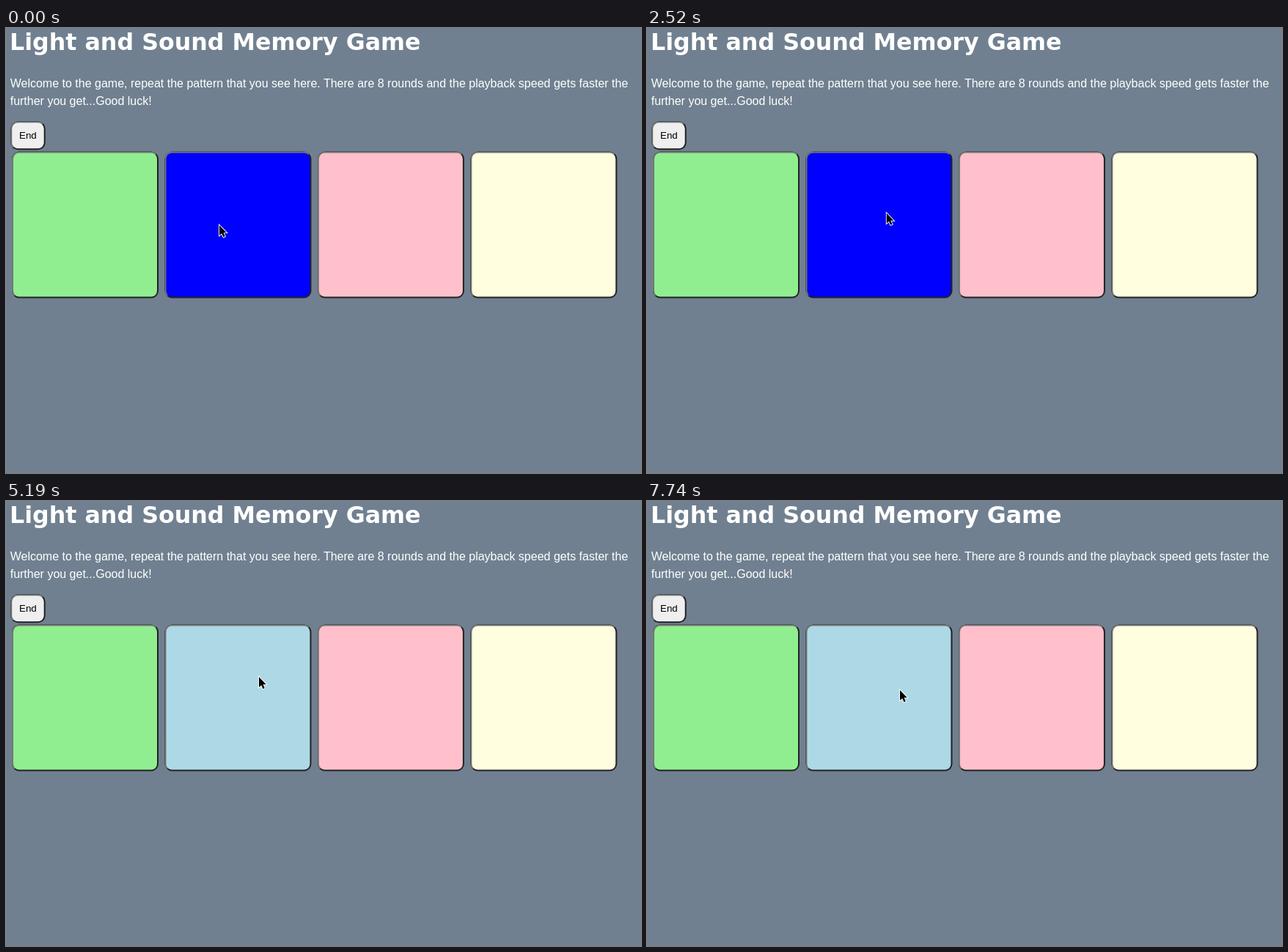
Recreate the animation shown at these times as an HTML page. Size 866 px wide and 607 px high, loop 8000 ms.

```html
<!DOCTYPE html>
<html lang="en">
<head>
<meta charset="utf-8">
<title>Light and Sound Memory Game</title>
<style>
  html, body { margin: 0; width: 100%; height: 100%; overflow: hidden; background: #708090; }
  svg { display: block; }
  text { font: 16px "Liberation Sans", Arial, sans-serif; fill: #fff; }
  .title { font: bold 31.7px "DejaVu Sans", Verdana, sans-serif; }
  .label { font-size: 13.33px; fill: #000; }
</style>
</head>
<body>
<svg width="866" height="607" viewBox="0 0 866 607">
  <text class="title" x="5" y="30">Light and Sound Memory Game</text>
  <text x="5.7" y="81">Welcome to the game, repeat the pattern that you see here. There are 8 rounds and the playback speed gets faster the</text>
  <text x="5.7" y="105">further you get...Good luck!</text>
  <g id="buttons"></g>
  <text class="label" x="18" y="151">End</text>
  <path id="cursor" d="M0 0V14L3.2 11.2 5.5 16.2 7.8 15.2 5.6 10.2H9.8Z"
    stroke="#fff" stroke-width="1.8" paint-order="stroke"/>
</svg>
<script>
const LOOP = 8000, STEP = 148;
const GREY = '#767676', DARK = '#222';
const buttons = document.getElementById('buttons');
const cursor = document.getElementById('cursor');

function add(parent, tag, attrs) {
  const el = document.createElementNS('http://www.w3.org/2000/svg', tag);
  for (const key in attrs) el.setAttribute(key, attrs[key]);
  return parent.appendChild(el);
}

// Raised button: the edge is split into a light top-left and a dark bottom-right half.
function addButton(x, y, width, height, fill) {
  const g = add(buttons, 'g', { transform: `translate(${x} ${y})` });
  const lower = add(g, 'rect', { width, height, rx: 10, fill: DARK });
  const upper = add(g, 'rect', { width, height, rx: 10, fill: GREY });
  const corner = Math.min(width, height) / 2;
  upper.style.clipPath = `polygon(0 0, ${width}px 0, ${width - corner}px ${corner}px, ${corner}px ${height - corner}px, 0 ${height}px)`;
  const face = add(g, 'rect', { x: 2, y: 2, width: width - 4, height: height - 4, rx: 8, fill });
  return { lower, upper, face };
}

addButton(6.2, 127.3, 47.5, 39, '#efefef');
const pads = ['lightgreen', 'lightblue', 'pink', 'lightyellow']
  .map((color, i) => addButton(8 + 208.45 * i, 168.5, 200, 200, color));
const bluePad = pads[1];

const playback = [[0, 440], [2520, 3260], [3560, 4450], [7140, 7740]];
const presses = [[1180, 1480], [4890, 5190], [5640, 6090]];

// Cursor moves: start time, number of steps, destination.
const moves = [
  [150, 1, 295, 269],
  [440, 4, 306, 240],
  [1780, 11, 344, 263],
  [3560, 3, 345, 251],
  [4150, 3, 345, 240],
  [6990, 3, 345, 258],
];

const within = (spans, t) => spans.some(([from, to]) => t >= from && t < to);

function cursorAt(t) {
  let x = 291, y = 269;
  for (const [start, steps, toX, toY] of moves) {
    if (t < start) break;
    const part = Math.min(1, (Math.floor((t - start) / STEP) + 1) / steps);
    x += (toX - x) * part;
    y += (toY - y) * part;
  }
  return [x, y];
}

function draw(t) {
  const pressed = within(presses, t);
  bluePad.face.setAttribute('fill', pressed || within(playback, t) ? 'blue' : 'lightblue');
  bluePad.upper.setAttribute('fill', pressed ? DARK : GREY);
  bluePad.lower.setAttribute('fill', pressed ? GREY : DARK);
  cursor.setAttribute('transform', `translate(${cursorAt(t)})`);
}

const began = performance.now();
function tick() {
  draw((performance.now() - began) % LOOP);
  requestAnimationFrame(tick);
}
tick();
</script>
</body>
</html>
```
